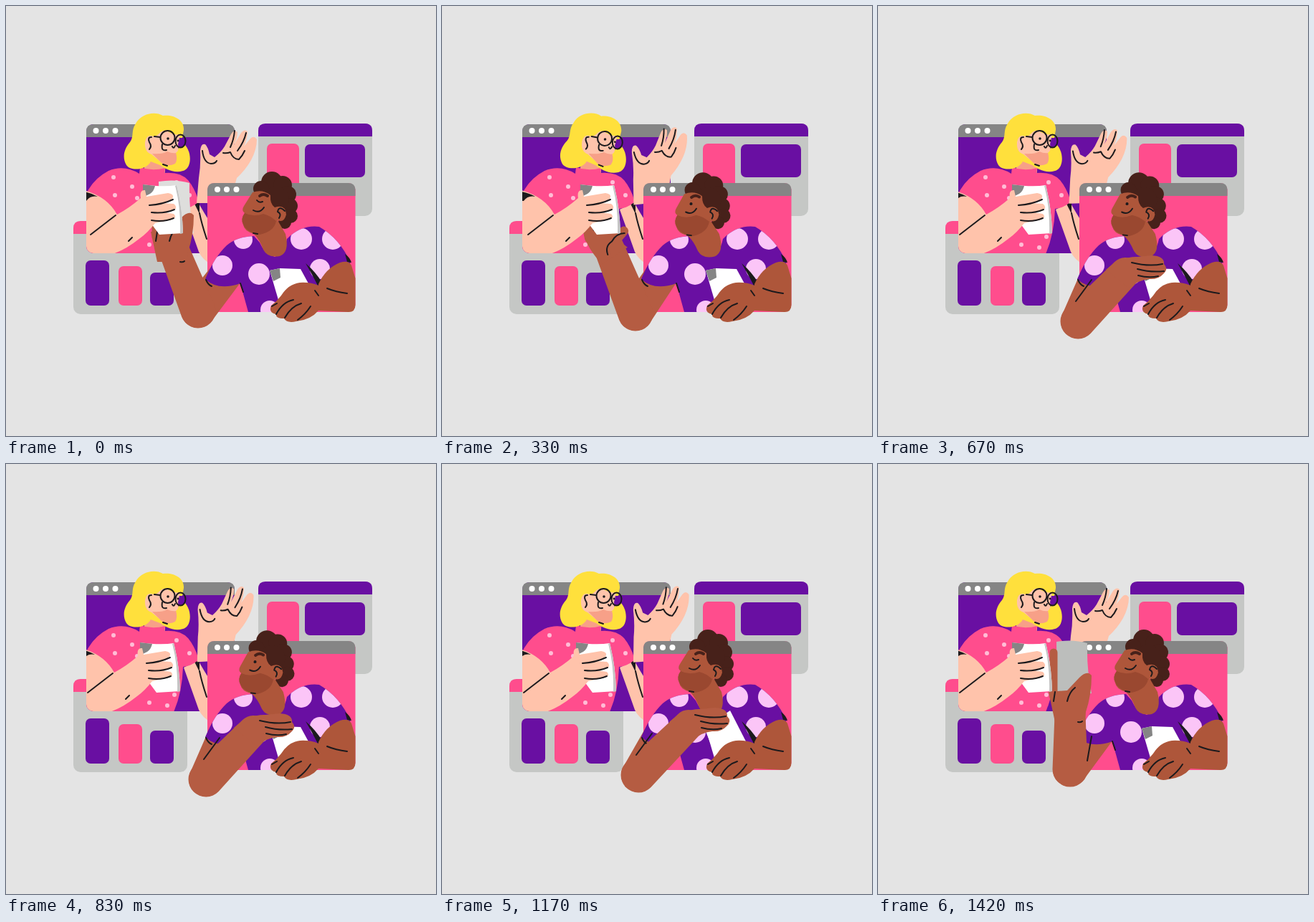
Write an HTML page that moves like this. It is 600 px wide and 600 px high and loops after 1.51 s.

```html
<!DOCTYPE html>
<html lang="en">
<head>
<meta charset="utf-8">
<title>Passing pages</title>
<style>
html, body { margin: 0; height: 100%; overflow: hidden; background: #e4e4e4; }
svg { display: block; width: 100%; height: 100%; }
.gray { fill: #c5c7c5; }
.bar { fill: #858585; }
.pink { fill: #ff4d8d; }
.purple { fill: #690fa2; }
.peach { fill: #ffc3ab; }
.blush { fill: #f7a088; }
.brown { fill: #ae563a; }
.arm { fill: #b55c42; }
.dark { fill: #9a4830; }
.hair { fill: #47211a; }
.yellow { fill: #ffe03c; }
.white { fill: #fff; }
.lilac { fill: #fbc5f7; }
.rose { fill: #ffbdd6; }
.fold { fill: #858585; }
.ink { fill: #1c1a1d; }
.line { fill: none; stroke: #1c1a1d; stroke-width: 2; stroke-linecap: round; stroke-linejoin: round; }
.finger { fill: none; stroke: #b55c42; stroke-width: 13; stroke-linecap: round; stroke-linejoin: round; }
</style>
</head>
<body>
<svg viewBox="0 0 600 600">
  <defs>
    <clipPath id="leftFrame"><rect x="112" y="140" width="207" height="205" rx="10"/></clipPath>
    <clipPath id="shirtShape"><path id="shirt" d="M346 321Q322 322 308 334Q291 350 278 381Q296 398 327 387L338 427H430L442 388L481 358Q465 324 437 308Q412 305 392 325Q388 345 375 350Q360 345 354 330Z"/></clipPath>
  </defs>

  <!-- back windows -->
  <rect class="gray" x="352" y="164" width="159" height="129" rx="10"/>
  <path class="purple" d="M352 182V174Q352 164 362 164H501Q511 164 511 174V182Z"/>
  <rect class="pink" x="364" y="192" width="45" height="70" rx="7"/>
  <rect class="purple" x="417" y="193" width="84" height="46" rx="7"/>
  <rect class="gray" x="94" y="300" width="159" height="130" rx="10"/>
  <path class="pink" d="M94 318V310Q94 300 104 300H253V318Z"/>
  <rect class="purple" x="111" y="355" width="33" height="63" rx="7"/>
  <rect class="pink" x="157" y="363" width="33" height="55" rx="7"/>
  <rect class="purple" x="201" y="372" width="33" height="46" rx="7"/>

  <!-- left window -->
  <rect class="purple" x="112" y="165" width="207" height="180" rx="10"/>
  <path class="bar" d="M112 183V175Q112 165 122 165H309Q319 165 319 175V183Z"/>
  <g class="white"><circle cx="125.500" cy="174" r="4"/><circle cx="139" cy="174" r="4"/><circle cx="152.500" cy="174" r="4"/></g>
  <path class="peach" d="M248 284L268 274Q276 288 286 304V360Q274 354 269 343Z"/>
  <path class="ink" d="M263 276L270 274V290Z"/>
  <path class="line" d="M270 289Q273 304 280 325"/>
  <g clip-path="url(#leftFrame)">
    <path class="blush" d="M203 203L223 219L221 240H190L196 212Z"/>
    <path class="pink" d="M112 262Q122 241 143 230Q165 221 186 234L187 225Q204 231 222 226L221 233Q243 231 254 243Q264 255 269 273Q259 282 247 283Q246 318 234 346H112Z"/>
    <g class="rose">
      <circle cx="150" cy="239" r="3"/><circle cx="176" cy="252" r="3"/><circle cx="152" cy="264" r="3"/>
      <circle cx="183" cy="268" r="3"/><circle cx="238" cy="246" r="3"/><circle cx="256" cy="264" r="3"/>
      <circle cx="200" cy="333" r="3"/><circle cx="225" cy="337" r="3"/><circle cx="235" cy="322" r="3"/>
    </g>
  </g>
  <g id="leftHead">
    <path class="yellow" d="M181 164C188 150 208 146 219 153C234 151 249 159 248 173L246 184L239 184L240 199L250 194C259 204 260 226 247 230C234 234 222 227 215 222L202 217C196 229 174 231 168 222C161 210 166 198 173 190C179 182 174 174 181 164Z"/>
    <path class="peach" d="M206 181C214 183 214 172 224 174Q234 181 243 179L240 193Q242 202 237 205L238 215Q232 225 220 221L203 207Q193 204 194 190Q196 178 206 182Z"/>
    <path class="blush" d="M204 206Q218 207 225 203Q232 206 237 205Q240 214 236 220Q226 225 217 219Z"/>
    <path class="line" d="M203 183Q197 183 200 190Q204 196 200 200M218 193Q216 203 224 201M219 221L225 223M207 182L215 183M232 196Q234 200 236 195"/>
    <circle class="line" cx="225.500" cy="184" r="10"/>
    <ellipse class="line" cx="243.500" cy="188.500" rx="7" ry="9"/>
    <circle class="ink" cx="226" cy="185" r="1.800"/><circle class="ink" cx="240" cy="188" r="1.400"/>
  </g>
  <g id="wave">
    <path class="peach" d="M266 275L269 240Q272 222 271 202Q272 191 278 193Q282 197 284 207L291 211Q300 204 305 196L314 179Q318 172 323 176Q323 184 318 194L328 177Q333 171 337 175Q337 185 332 196L341 185Q346 180 350 186Q350 200 342 215Q334 229 322 240L312 275Z"/>
    <path class="line" d="M274 202Q276 219 286 220Q292 220 294 216M335 177Q332 190 323 202M303 205Q308 206 313 204Q317 214 325 214Q330 209 333 202M319 174Q318 186 313 197"/>
  </g>

  <!-- right window -->
  <rect class="pink" x="281" y="247" width="206.500" height="180" rx="10"/>
  <path class="bar" d="M281 265V257Q281 247 291 247H477.500Q487.500 247 487.500 257V265Z"/>
  <g class="white"><circle cx="295" cy="256" r="4"/><circle cx="308" cy="256" r="4"/><circle cx="321.500" cy="256" r="4"/></g>
  <path id="upperArm" class="arm"/>
  <use href="#shirt" class="purple"/>
  <g class="lilac" clip-path="url(#shirtShape)">
    <circle cx="353" cy="374" r="15"/><circle cx="302" cy="362" r="14"/><circle cx="331" cy="326" r="13"/>
    <circle cx="412" cy="325" r="15"/><circle cx="438" cy="367" r="14"/><circle cx="456" cy="325" r="15"/><circle cx="368" cy="424" r="13"/>
  </g>
  <path class="line" d="M279 382Q282 389 287 391M327 387L331 399"/>
  <g id="rightHead">
    <g class="hair">
      <circle cx="371" cy="246" r="15"/><circle cx="356" cy="255" r="11"/><circle cx="386" cy="250" r="13"/>
      <circle cx="393" cy="263" r="12"/><circle cx="396" cy="279" r="11"/><circle cx="397" cy="293" r="10"/>
      <circle cx="389" cy="302" r="9"/><circle cx="377" cy="270" r="18"/>
    </g>
    <path class="brown" d="M344 260Q358 255 369 264Q368 276 375 281Q390 276 391 291Q388 303 379 299L390 318Q396 344 382 349Q365 352 359 340Q354 326 346 318Q332 314 331 305Q327 297 333 289Q328 285 332 279Z"/>
    <path class="dark" d="M333 289Q345 295 359 290Q368 292 377 300Q374 315 354 319Q336 316 331 305Q327 297 333 289Z"/>
    <path class="line" d="M389 286Q381 278 379 287Q385 290 381 296M345 285Q354 290 360 281M345 317L351 318"/>
    <path class="line" d="M354 265Q359 261 365 265" style="stroke:#47211a;stroke-width:4"/>
    <circle id="eyeOpen" class="ink" cx="353" cy="274" r="2"/>
    <path id="eyeShut" class="line" d="M350 271Q353 275 358 273"/>
  </g>
  <path class="white" d="M368 369L382 366L411 367L423 389L400 410H380Z"/>
  <path class="fold" d="M368 369L382 366L383 379L373 384Z"/>
  <path id="lifted" class="white" d="M366 368L402 344L424 387L381 406Z"/>
  <path class="ink" d="M418 359Q433 372 441 386L435 390Q428 376 418 359ZM473 346Q480 351 482 358L476 357Z"/>
  <path class="brown" d="M436 388Q446 366 466 358Q478 354 482 362L487.500 380V417Q487.500 427 478 427L436 425Q425 438 405 440Q392 443 388 436Q376 436 377 430Q366 428 370 418Q378 412 384 404Q394 388 410 386Q424 385 436 390Z"/>
  <path class="line" d="M448 394Q460 399 476 401M431 397L436 404M371 419L378 415M377 430Q386 413 401 410M389 435Q398 419 412 415M407 438Q418 430 425 419"/>

  <!-- reaching arm -->
  <path id="forearm" class="arm"/>
  <path id="armLine" class="line"/>
  <g id="open">
    <path class="finger" d="M284 325L303 289M298 325L319 293M312 334L329 302M300 352L328 347"/>
    <path class="arm" d="M276 365Q272 335 283 313L322 316Q326 334 314 352L318 368Z"/>
    <path class="line" d="M296 320L310 298M310 325L322 293M290 359Q294 347 306 348Q318 343 327 350"/>
  </g>
  <g id="hold">
    <path id="page" d="M249 248Q272 244 292 250Q291 286 298 320L250 326Z"/>
    <path class="finger" d="M245 263V325" style="stroke-width:11"/>
    <path class="arm" d="M238 318L264 316L281 298Q292 287 298 295Q298 322 290 346L288 360H247Z"/>
    <path class="line" d="M264 331Q267 318 275 312M247 318L245 331M279 360Q283 361 285 359"/>
  </g>
  <g id="rest">
    <path class="arm" d="M318 368Q340 349 362 350L382 348Q400 349 399 360Q406 367 398 374Q391 382 378 381Q364 382 350 394Z"/>
    <path class="line" d="M354 358Q378 364 397 360M362 367Q380 372 399 370M363 376Q378 380 391 377"/>
  </g>

  <!-- left person's near arm -->
  <g clip-path="url(#leftFrame)">
    <g id="nearArm">
      <path class="white" d="M187 249Q215 253 234 250Q242 280 243 317L210 319L196 300Z"/>
      <path d="M234 250Q242 280 243 317L239 318Q240 280 232 251Z" fill="#c4c4c4"/>
      <path class="fold" d="M187 249L204 251Q202 259 197 262L187 267Z"/>
      <path class="peach" d="M95 255Q135 262 151 291Q168 282 184 268Q182 256 190 257L192 266L222 261Q233 263 227 270L214 275L230 276Q236 280 231 285L216 288L230 290Q235 295 228 298L204 303Q194 316 183 324Q163 340 145 346H95Z"/>
      <path class="ink" d="M95 258Q113 259 124 266Q114 264 108 272H95Z"/>
      <path class="line" d="M114 319L149 292M196 278Q214 277 229 270M199 288Q217 290 231 284M199 299Q216 302 230 296M167 328L172 323"/>
    </g>
  </g>
</svg>
<script>
const $ = id => document.getElementById(id);
const set = (id, name, value) => $(id).setAttribute(name, value);
const show = (id, on) => set(id, 'visibility', on ? 'visible' : 'hidden');

// Linear track of [step, ...values]
function track(step, keys) {
  const i = Math.max(1, keys.findIndex(key => key[0] >= step));
  const [a, b] = [keys[i - 1], keys[i]];
  const u = (step - a[0]) / (b[0] - a[0]);
  return a.slice(1).map((v, j) => v + (b[j + 1] - v) * u);
}

// Tapered limb with round ends
function limb([ax, ay], ra, [bx, by], rb) {
  const d = Math.hypot(bx - ax, by - ay), nx = (ay - by) / d, ny = (bx - ax) / d;
  return `M${ax + nx * ra} ${ay + ny * ra}A${ra} ${ra} 0 0 1 ${ax - nx * ra} ${ay - ny * ra}` +
    `L${bx - nx * rb} ${by - ny * rb}A${rb} ${rb} 0 0 1 ${bx + nx * rb} ${by + ny * rb}Z`;
}

const wristKeys = [[0, 232, 335], [2, 229, 334], [4, 232, 335], [6, 298, 350], [8, 345, 372],
  [12, 345, 372], [14, 344, 364], [15, 326, 352], [17, 268, 338], [18, 232, 335]];
const elbowKeys = [[0, 268, 425], [4, 270, 429], [6, 273, 435], [8, 279, 440], [12, 279, 440],
  [14, 274, 434], [17, 268, 426], [18, 268, 425]];
const waveKeys = [[0, 0], [1, 0], [4, -6], [6, -10], [8, -2], [9, 0], [12, -10], [14, -4], [16, 0], [18, 0]];
const turnKeys = [[0, 0], [2, 1], [12, 1], [14, 0], [18, 0]];
const tiltKeys = [[0, 0], [3, 3], [4, 3], [6, 2], [8, 0], [18, 0]];
const pullKeys = [[0, 4], [2, 7], [4, 6], [6, 0], [17, 0], [18, 4]];

function draw(step) {
  const wrist = track(step, wristKeys), elbow = track(step, elbowKeys);
  const [wx, wy] = wrist, [ex, ey] = elbow;
  const angle = Math.atan2(wx - ex, ey - wy) * 180 / Math.PI;
  const place = (id, turn, x, y) =>
    set(id, 'transform', `translate(${wx} ${wy}) rotate(${turn}) translate(${-x} ${-y})`);

  set('upperArm', 'd', limb(elbow, 24, [306, 376], 23));
  set('forearm', 'd', limb(elbow, 24.5, wrist, 21));
  set('armLine', 'd', step > 6 && step < 16
    ? `M${ex - 3} ${ey - 28}L${ex + 19} ${ey - 58}`
    : `M${ex + 24} ${ey - 12}L${ex + (step > 4 ? 30 : 16)} ${ey - 46}`);
  show('armLine', step > 4);

  place('open', angle - 16.4, 298, 350);
  place('hold', Math.max(0, angle) * .8, 268, 338);
  place('rest', 0, 345, 372);
  show('open', step > 0 && step < 7);
  show('hold', step === 0 || step > 14);
  show('rest', step > 6 && step < 15);
  show('lifted', step === 13 || step === 14);
  set('page', 'fill', step ? '#bcbebc' : '#dededc');

  const [turn] = track(step, turnKeys);
  set('rightHead', 'transform', `translate(${-2 * turn} ${turn}) rotate(${-3 * turn} 372 340)`);
  show('eyeOpen', turn > .5);
  show('eyeShut', turn <= .5);
  set('wave', 'transform', `rotate(${track(step, waveKeys)} 290 262)`);
  set('leftHead', 'transform', `rotate(${track(step, tiltKeys)} 208 215)`);
  set('nearArm', 'transform', `translate(${track(step, pullKeys)} 0)`);
}

function play() {
  const time = performance.now() % 1510;
  draw(Math.min(17, Math.floor((time + 5) / 83.5)));
  requestAnimationFrame(play);
}
play();
</script>
</body>
</html>
```
